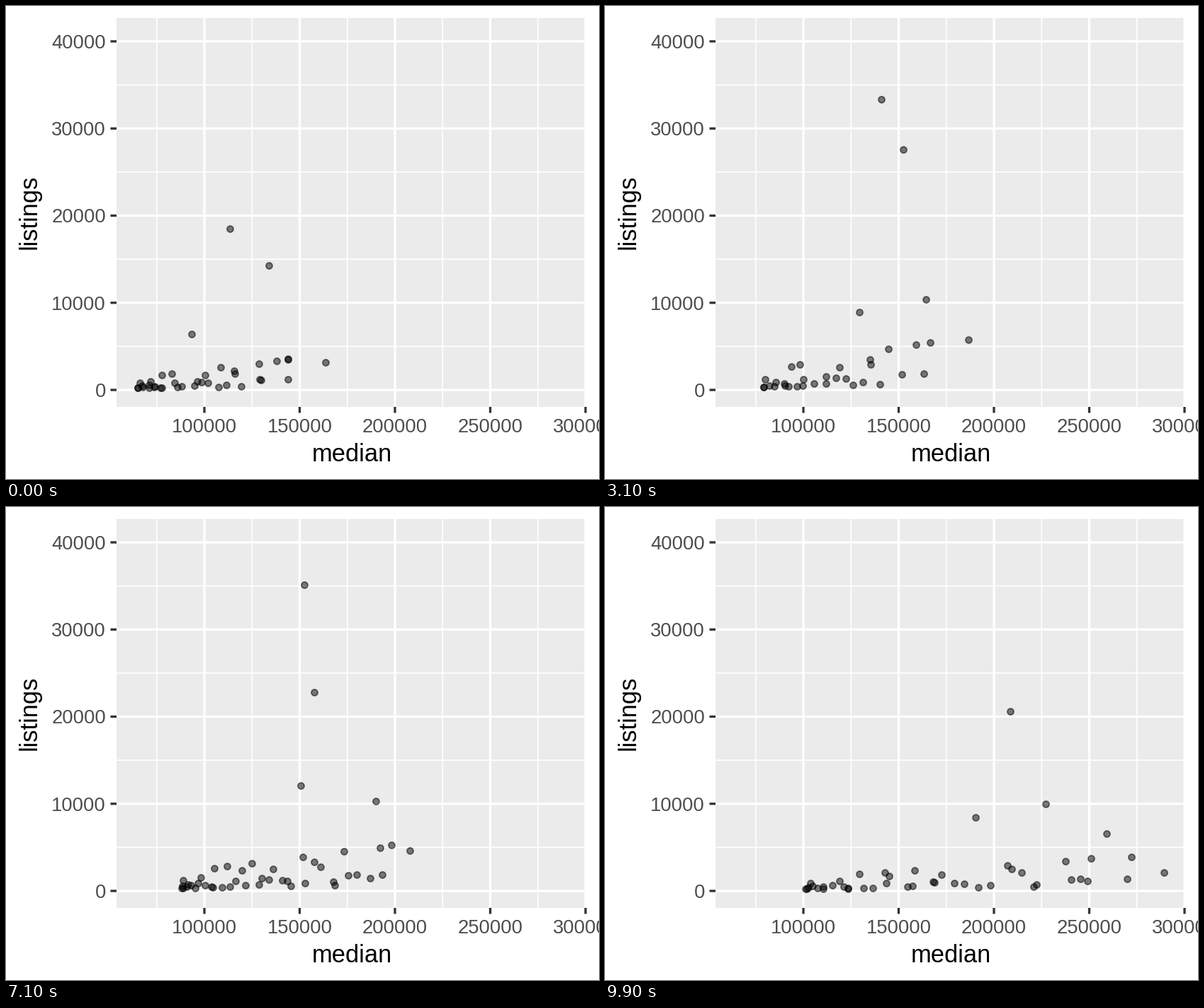
These frames come from a looping animation (837x669 px, 10000 ms). A matplotlib script:

```python
import numpy as np
import matplotlib.pyplot as plt
from matplotlib.animation import FuncAnimation
from matplotlib.patches import Rectangle

W, H, DPI = 837, 669, 64
FRAMES, INTERVAL = 100, 100
YEARS = 15
PT = 72 / DPI  # points per pixel

plt.rcParams["font.family"] = "Liberation Sans"
plt.rcParams["text.hinting"] = "force_autohint"

LEFT, RIGHT, TOP, BOTTOM = 156, 818, 17, 567

# Turning points of the big markets: frame, price and listings in thousands
MARKETS = [
    [(0, 113.4, 18.5), (19, 132, 29), (42, 149, 37.4), (46, 150.5, 40.6),
     (57, 150.5, 34.1), (71, 152.6, 35.1), (91, 192.7, 19), (99, 208.5, 20.6)],
    [(0, 133.8, 14.3), (19, 147.4, 25.1), (42, 157.2, 29.9),
     (71, 157.6, 22.8), (91, 202.2, 11.6), (99, 227.1, 10)],
    [(0, 93.3, 6.4), (42, 142.4, 9.8), (57, 147.4, 12.6), (71, 150.6, 12.1), (99, 190.5, 8.4)],
    [(0, 143.9, 3.6), (19, 154.1, 10.1), (57, 186.1, 11.1), (71, 190, 10.3), (99, 259.1, 6.6)],
    [(0, 163.6, 3.2), (42, 194.6, 6.7), (71, 207.8, 4.6), (91, 257, 2.3), (99, 289.4, 2.1)],
]

# The crowd of towns follows one shared market cycle
CYCLE = [0, 42, 71, 99]
CHEAPEST = [65, 84, 88, 101]
DEAREST = [144, 175, 198, 272]
VOLUME = [0.8, 1.4, 1.2, 0.9]
TOWNS = 41

rng = np.random.default_rng(8)
rank = rng.permutation(np.linspace(0, 1, TOWNS))
size = np.exp(0.65 * np.clip(rng.normal(size=TOWNS), -1.5, 1.5) + rank - 0.5)
wobble = rng.normal(0, 0.015, (YEARS + 1, TOWNS))


def town_count(f):
    """Towns with figures; the number changes only at a new year."""
    return 34 if f < 7 else 30 if f < 47 else 38 if f < 66 else TOWNS


def towns(f):
    low, high, volume = (np.interp(f, CYCLE, v) for v in (CHEAPEST, DEAREST, VOLUME))
    year = f * YEARS / (FRAMES - 1)
    y = min(int(year), YEARS - 1)
    drift = wobble[y] + (wobble[y + 1] - wobble[y]) * (year - y)
    share = np.clip(rank + drift, 0, 1) ** 1.6
    return (low + (high - low) * share)[:town_count(f)], (volume * size)[:town_count(f)]


def x_px(price):
    return 280 + (price - 100) * 2.69


def y_px(listings):
    return 543 - listings * 12.325


def positions(f):
    price, listings = towns(f)
    for points in MARKETS:
        t, p, n = zip(*points)
        price = np.append(price, np.interp(f, t, p))
        listings = np.append(listings, np.interp(f, t, n))
    return np.column_stack([x_px(price), y_px(listings)])


fig = plt.figure(figsize=(W / DPI, H / DPI), dpi=DPI, facecolor="white")
ax = fig.add_axes([0, 0, 1, 1])
ax.set(xlim=(0, W), ylim=(H, 0))
ax.axis("off")
panel = Rectangle((LEFT, TOP), RIGHT - LEFT, BOTTOM - TOP, fc="#EBEBEB", lw=0)
ax.add_patch(panel)


def line(x0, y0, x1, y1, color, width, clip=False):
    art, = ax.plot([x0, x1], [y0, y1], color=color, lw=width * PT,
                   solid_capstyle="butt", snap=False, zorder=2)
    if clip:
        art.set_clip_path(panel)


def label(x, y, text, size_px, color, **kw):
    ax.text(x, y, text, fontsize=size_px * PT, color=color, va="baseline", **kw)


for v in range(75, 300, 50):
    line(x_px(v), TOP, x_px(v), BOTTOM, "white", 1.67, True)
for v in range(5, 40, 10):
    line(LEFT, y_px(v), RIGHT, y_px(v), "white", 1.67, True)
for v in range(100, 301, 50):
    x = x_px(v)
    line(x, TOP, x, BOTTOM, "white", 3.3, True)
    line(x, BOTTOM, x, BOTTOM + 8.5, "#333333", 3.3)
    label(x, 603, str(v * 1000), 27.4, "#4D4D4D", ha="center")
for v in range(0, 41, 10):
    y = y_px(v)
    line(LEFT, y, RIGHT, y, "white", 3.3, True)
    line(LEFT - 8.5, y, LEFT, y, "#333333", 3.3)
    label(141, y + 10, str(v * 1000), 27.4, "#4D4D4D", ha="right")
label(488, 644, "median", 34.5, "black", ha="center")
label(43, 291, "listings", 34.5, "black", ha="center",
      rotation=90, rotation_mode="anchor")

dots = ax.scatter([], [], s=(9 * PT) ** 2, facecolor=(0, 0, 0, 0.5),
                  edgecolor=(0, 0, 0, 0.5), linewidth=1.9 * PT, zorder=3)


def update(f):
    dots.set_offsets(positions(f))
    return dots,


anim = FuncAnimation(fig, update, frames=FRAMES, interval=INTERVAL,
                     repeat=True, repeat_delay=0, blit=False)
plt.show()
```
